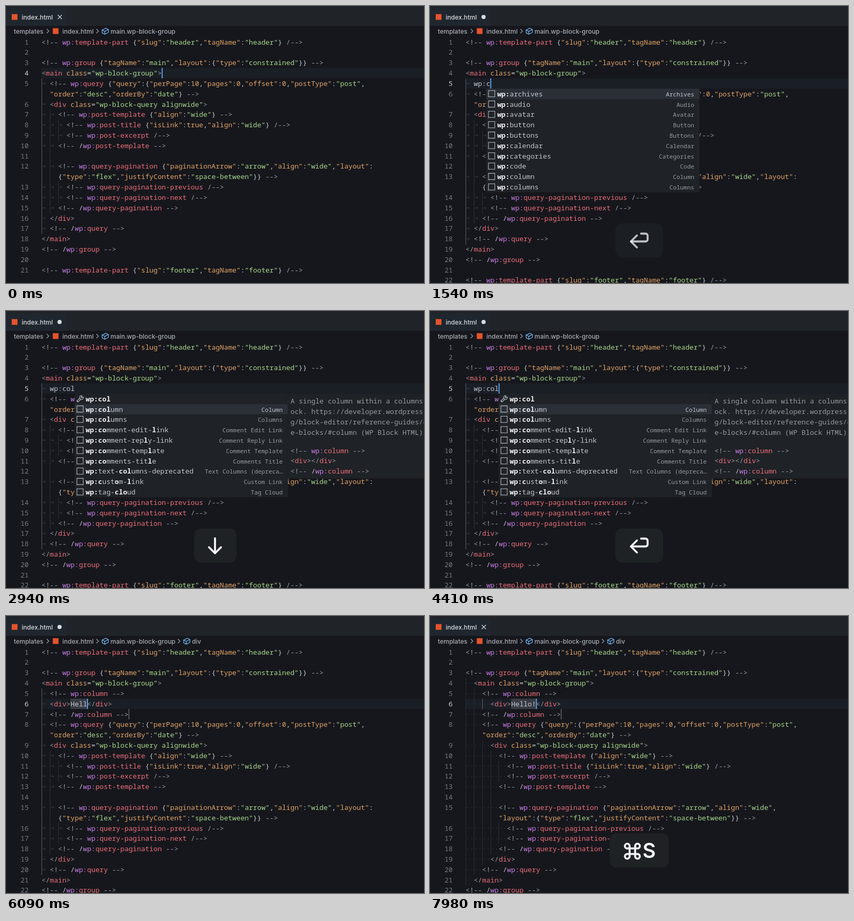
Recreate the animation shown at these times as an HTML page with a canvas. Size 800 px wide and 530 px high, loop 8 s.

```html
<!DOCTYPE html>
<html lang="en">
<head>
<meta charset="utf-8">
<title>Block editing</title>
<style>
  html, body { margin: 0; width: 100%; height: 100%; overflow: hidden; background: #16171c; }
  canvas { display: block; }
</style>
</head>
<body>
<canvas id="stage" width="800" height="530"></canvas>
<script>
const ctx = document.getElementById('stage').getContext('2d');

const LOOP = 8000, LEFT = 68, CHAR = 7.937, ROW = 19.82, TOP = 69, COLS = 80;
const MONO = '"Noto Sans Mono", "DejaVu Sans Mono", monospace';
const CODE = `500 13.23px ${MONO}`, BOLD = `bold 13.23px ${MONO}`;
const SMALL = `500 11.3px ${MONO}`, UI = '500 12px Inter, sans-serif';

const C = {
  bg: '#16171c', bar: '#202429', tab: '#20262d', line: '#1a1e25', popup: '#1f2226', picked: '#2b2f36',
  text: '#c3c8d1', dim: '#979da6', faint: '#34373e', guide: '#2b2e34', activeGuide: '#5a5e66',
  number: '#737984', white: '#f2f4f7', red: '#ec6f7b', purple: '#c87de6',
  orange: '#e2a468', green: '#a8d98c', blue: '#5a9cf0', icon: '#75beff', html: '#e5532d'
};

// Timeline in ms
const T = { enter: 420, down: 2770, accept: 4410, insert: 4480, crumb: 4760, save: 7350, format: 7490 };
const QUERY_KEYS = [840, 1050, 1260, 1540, 1750, 1950];
const HELLO_KEYS = [5460, 5670, 5810, 5950, 6160, 6440];
const EDITS = [0, T.enter, ...QUERY_KEYS, T.insert, ...HELLO_KEYS, T.format];
const POPUP_LAG = 70;
const KEYS = [
  { at: T.enter, width: 91, draw: drawReturn },
  { at: T.down, width: 81, draw: drawDown },
  { at: T.accept, width: 91, draw: drawReturn },
  { at: T.save, width: 113, draw: drawSave }
];

// Each leading dot is one level of indentation
const parse = src => src.trim().split('\n').map(s => {
  const depth = s.match(/^\.*/)[0].length;
  return { depth, text: s.slice(depth).trim() };
});

const HEAD = parse(`
<!-- wp:template-part {"slug":"header","tagName":"header"} /-->

<!-- wp:group {"tagName":"main","layout":{"type":"constrained"}} -->
<main class="wp-block-group">`);
const BODY = parse(`
.<!-- wp:query {"query":{"perPage":10,"pages":0,"offset":0,"postType":"post","order":"desc","orderBy":"date"} -->
.<div class="wp-block-query alignwide">
..<!-- wp:post-template {"align":"wide"} -->
...<!-- wp:post-title {"isLink":true,"align":"wide"} /-->
...<!-- wp:post-excerpt /-->
..<!-- /wp:post-template -->
..
..<!-- wp:query-pagination {"paginationArrow":"arrow","align":"wide","layout":{"type":"flex","justifyContent":"space-between"}} -->
...<!-- wp:query-pagination-previous /-->
...<!-- wp:query-pagination-next /-->
..<!-- /wp:query-pagination -->
.</div>
.<!-- /wp:query -->
</main>
<!-- /wp:group -->

<!-- wp:template-part {"slug":"footer","tagName":"footer"} /-->`);

const RULES = [
  [/<!--|\/?-->/, C.dim], [/(?<=wp:)[\w-]+/, C.red], [/wp:/, C.purple],
  [/"[^"]*"(?=:)/, C.orange], [/"[^"]*"/, C.green], [/(?<=<\/?)\w+/, C.red],
  [/\b(?:class|true|\d+)\b/, C.orange], [/<\/?|>/, C.dim]
];
const LEXER = new RegExp(RULES.map(r => `(${r[0].source})`).join('|'), 'g');

// Suggestions: "~" marks a plain word, "!" an abbreviation, the rest are blocks
const POPUPS = {
  'w': '~wide ~wp ~wp-block-group ~wp-block-query archives audio avatar button buttons calendar',
  'wp': '~wp ~wp-block-group ~wp-block-query archives audio avatar button buttons calendar categories',
  'wp:': 'archives audio avatar button buttons calendar categories code column columns',
  'wp:c': '!wp:c calendar categories code column columns comment-author-avatar-depre… comment-author-name comment-content comment-date',
  'wp:co': '!wp:co code column columns comment-author-avatar-depre… comment-author-name comment-content comment-date comment-edit-link comment-reply-link',
  'wp:col': '!wp:col column columns comment-edit-link comment-reply-link comment-template comments-title text-columns-deprecated custom-link tag-cloud'
};
const DETAILS = {
  'comment-author-avatar-depre…': 'Comment Author …',
  'text-columns-deprecated': 'Text Columns (depreca…'
};
const MATCHES = { 'tag-cloud': 'wp:clo' };
const COLUMN_DOC = [
  'A single column within a columns bl', 'ock. https://developer.wordpress.or',
  'g/block-editor/reference-guides/cor', 'e-blocks/#column (WP Block HTML)'
];

const rowY = row => TOP + row * ROW;
const colX = col => LEFT + col * CHAR;
const typed = (word, times, t) => word.slice(0, times.filter(k => t >= k).length);

function rect(x, y, w, h, color) {
  ctx.fillStyle = color;
  ctx.fillRect(x, y, w, h);
}

function write(s, x, y, color, font = CODE, align = 'left') {
  ctx.font = font;
  ctx.fillStyle = color;
  ctx.textAlign = align;
  ctx.fillText(s, x, y + 4.6);
}

function stroke(points, color, width = 1) {
  ctx.strokeStyle = color;
  ctx.lineWidth = width;
  ctx.beginPath();
  points.forEach(([x, y]) => ctx.lineTo(x, y));
  ctx.stroke();
}

function writeCode(s, x, y) {
  let last = 0;
  const put = (from, to, color) => to > from && write(s.slice(from, to), x + from * CHAR, y, color);
  if (s.includes('<') || s.includes('"')) {
    for (const m of s.matchAll(LEXER)) {
      put(last, m.index, C.text);
      last = m.index + m[0].length;
      put(m.index, last, RULES[m.slice(1).findIndex(g => g !== undefined)][1]);
    }
  }
  put(last, s.length, C.text);
}

function format(lines) {
  let depth = 0;
  return lines.map(({ text }) => {
    const closing = /^<(!-- )?\//.test(text);
    if (closing) depth--;
    const line = { depth, text };
    if (text && !closing && !text.endsWith('/-->') && !text.includes('</')) depth++;
    return line;
  });
}

function documentAt(t) {
  if (t < T.enter) return { lines: [...HEAD, ...BODY], cursor: 3, col: 29 };
  if (t < T.insert) {
    const text = typed('wp:col', QUERY_KEYS, t);
    return { lines: [...HEAD, { depth: 1, text }, ...BODY], cursor: 4, col: 2 + text.length };
  }
  const hello = typed('Hello!', HELLO_KEYS, t);
  const snippet = parse(`.<!-- wp:column -->\n.<div>${hello}</div>\n.<!-- /wp:column -->`);
  const raw = [...HEAD, ...snippet, ...BODY];
  const spaced = t >= T.format;
  const lines = spaced ? format(raw) : raw;
  const start = lines[5].depth * 2 + 5;
  return { lines, cursor: 5, col: start + hello.length, start, spaced };
}

function wrap({ depth, text }) {
  const room = COLS - depth * 2;
  if (text.length <= room) return [text];
  const head = text.slice(0, room);
  const cut = Math.max(head.lastIndexOf(','), head.lastIndexOf(':')) + 1;
  return [text.slice(0, cut), text.slice(cut)];
}

function drawLine(line, index, row, doc) {
  const { depth, text } = line, parts = wrap(line), y = rowY(row), top = y - ROW / 2;
  const current = index === doc.cursor;
  if (current) {
    rect(LEFT, top, 800 - LEFT, ROW, C.line);
    if (doc.start) rect(colX(doc.start), top, Math.max(2, (doc.col - doc.start) * CHAR), ROW, '#393d43');
  }
  for (let k = 0; k < depth; k++) {
    const active = doc.spaced ? k === 2 && index === 5 : k === 0;
    rect(Math.round(colX(k * 2)), top, 1, ROW * parts.length + 0.5, active ? C.activeGuide : C.guide);
    if (!text) continue;
    if (doc.spaced) {
      for (const c of [0.5, 1.5]) rect(colX(k * 2 + c) - 0.7, y - 0.5, 1.4, 1.4, C.faint);
    } else {
      const x = colX(k * 2) + 1.5;
      stroke([[x, y], [x + 6, y]], C.faint);
      stroke([[x + 3.5, y - 2], [x + 6, y], [x + 3.5, y + 2]], C.faint);
    }
  }
  write(index + 1, 43.5, y, current ? '#ccd0d7' : C.number, CODE, 'right');
  parts.forEach((part, i) => writeCode(part, colX(depth * 2), rowY(row + i)));
  if (doc.start && index === 6) rect(colX(depth * 2 + text.length), top, 1.2, ROW, '#777b82');
  return parts.length;
}

function drawEditor(t) {
  const doc = documentAt(t);
  let row = 0, cursorRow = 0;
  doc.lines.forEach((line, i) => {
    if (i === doc.cursor) cursorRow = row;
    if (row < 24) row += drawLine(line, i, row, doc);
  });
  const lastEdit = EDITS.filter(e => e <= t).pop();
  if ((t - lastEdit) % 1000 < 500) rect(colX(doc.col) - 0.3, rowY(cursorRow) - ROW / 2, 2, ROW, C.blue);
}

function drawCube(x, y) {
  const p = (dx, dy) => [x + dx, y + dy];
  stroke([p(-6, -2), p(1, -5.5), p(6, -3), p(6, 2.5), p(-1, 6), p(-6, 3.3), p(-6, -2), p(-1, 0.5), p(6, -3)], C.icon, 1.2);
  stroke([p(-1, 0.5), p(-1, 6)], C.icon, 1.2);
}

function drawChevron(x) {
  stroke([[x - 2, 44], [x + 2, 48], [x - 2, 52]], '#9a9fa7', 1.3);
}

function drawHeader(t) {
  rect(0, 0, 800, 38, C.bar);
  rect(0, 5, 116, 33, C.tab);
  rect(11, 15.5, 11, 11, C.html);
  write('index.html', 30, 21, '#d8dbe0', UI);
  if (t >= T.enter && t < T.format) {
    ctx.fillStyle = '#d8dbe0';
    ctx.beginPath();
    ctx.arc(102.5, 21, 4, 0, 7);
    ctx.fill();
  } else {
    stroke([[99, 17], [107, 25]], '#d0d3d8', 1.2);
    stroke([[107, 17], [99, 25]], '#d0d3d8', 1.2);
  }
  const crumb = '#a8adb5';
  write('templates', 15, 48, crumb, UI);
  drawChevron(80);
  rect(89.5, 42.5, 11, 11, C.html);
  write('index.html', 108, 48, crumb, UI);
  drawChevron(175);
  drawCube(190, 48);
  write('main.wp-block-group', 200, 48, crumb, UI);
  if (t >= T.crumb) {
    drawChevron(331);
    drawCube(346, 48);
    write('div', 356, 48, crumb, UI);
  }
}

function drawItemIcon(kind, x, y) {
  if (kind === '~') {
    write('abc', x + 3, y - 0.5, C.text, '9px Inter, sans-serif');
  } else if (kind === '!') {
    ctx.strokeStyle = C.text;
    ctx.lineWidth = 1.2;
    ctx.beginPath();
    ctx.arc(x + 13, y - 2.5, 3.6, -0.3, 4.9);
    ctx.stroke();
    stroke([[x + 14, y - 6], [x + 12.5, y - 2.5], [x + 16.5, y - 3.5]], C.text, 1.2);
    stroke([[x + 9.5, y - 1], [x + 4, y + 4.2], [x + 6, y + 6], [x + 11.8, y + 1]], C.text, 1.2);
  } else {
    ctx.setLineDash([1.6, 0.5]);
    ctx.strokeStyle = C.text;
    ctx.lineWidth = 1.3;
    ctx.strokeRect(x + 4.2, y - 6.4, 12, 12);
    ctx.setLineDash([]);
  }
}

function writeLabel(label, query, x, y) {
  let hit = 0;
  [...label].forEach((ch, i) => {
    const match = ch === query[hit];
    if (match) hit++;
    write(ch, x + i * CHAR, y, match ? C.white : C.text, match ? BOLD : CODE);
  });
}

function drawDocs(x, query, picked) {
  const top = rowY(5) - ROW / 2, first = 172.8;
  if (picked) {
    rect(x, top, 800 - x, 162, C.popup);
    COLUMN_DOC.forEach((s, i) => write(s, x + 5, first + i * ROW, C.dim));
    ['<!-- wp:column -->', '<div></div>', '<!-- /wp:column -->']
      .forEach((s, i) => writeCode(s, x + 5, 267 + i * ROW));
  } else {
    rect(x, top, 800 - x, 62.5, C.popup);
    write('Emmet Abbreviation', x + 5, first, C.dim);
    write(`<${query}>|</${query}>`, x + 5, 207.7, C.text);
  }
}

function drawPopup(t) {
  if (t >= T.insert) return;
  const query = typed('wp:col', QUERY_KEYS, t - POPUP_LAG);
  if (!query) return;
  const x = colX(2 + query.length), top = rowY(5) - ROW / 2;
  const selected = t >= T.down ? 1 : 0;
  const items = POPUPS[query].split(' ');
  rect(x, top, 408, ROW * 10, C.popup);
  rect(x, top + selected * ROW, 408, ROW, C.picked);
  items.forEach((item, i) => {
    const y = rowY(5 + i), kind = item[0], block = !'~!'.includes(kind);
    drawItemIcon(kind, x, y);
    writeLabel(block ? 'wp:' + item : item.slice(1), MATCHES[item] || query, x + 21, y);
    if (!block) return;
    const title = item.split('-').map(w => w[0].toUpperCase() + w.slice(1)).join(' ');
    write(DETAILS[item] || title, x + 398, y, i === selected ? C.text : C.dim, SMALL, 'right');
  });
  if (items[0][0] === '!') {
    if (query !== 'wp:col') rect(x + 399, top, 8, 54, '#40444b');
    drawDocs(x + 408, query, selected);
  }
}

function drawReturn() {
  ctx.beginPath();
  ctx.moveTo(404, 435.5);
  ctx.lineTo(412, 435.5);
  ctx.arcTo(416.5, 435.5, 416.5, 440, 4);
  ctx.arcTo(416.5, 450.5, 412, 450.5, 4);
  ctx.lineTo(385, 450.5);
  ctx.stroke();
  stroke([[396, 439], [384.5, 450.5], [396, 462]], C.white, 3.8);
}

function drawDown() {
  stroke([[400, 435], [400, 463]], C.white, 3.8);
  stroke([[388.5, 452], [400, 463.5], [411.5, 452]], C.white, 3.8);
}

function drawSave() {
  ctx.save();
  ctx.translate(387.3, 450);
  ctx.lineWidth = 3.8;
  for (let i = 0; i < 4; i++) {
    ctx.beginPath();
    ctx.moveTo(5.3, -10);
    ctx.lineTo(5.3, 10);
    ctx.arc(9.8, 9.8, 4.5, Math.PI, -Math.PI / 2, true);
    ctx.stroke();
    ctx.rotate(Math.PI / 2);
  }
  ctx.restore();
  write('S', 419.5, 458.5, C.white, '600 39px Inter, sans-serif', 'center');
}

function drawKeys(t) {
  const key = KEYS.filter(k => k.at <= t).pop();
  if (!key) return;
  const alpha = 1 - (t - key.at - 1000) / 500;
  if (alpha <= 0) return;
  ctx.save();
  ctx.globalAlpha = Math.min(1, alpha);
  ctx.fillStyle = '#1e2225';
  ctx.beginPath();
  ctx.roundRect(400.5 - key.width / 2, 416, key.width, 65.5, 13);
  ctx.fill();
  ctx.strokeStyle = C.white;
  ctx.lineWidth = 3.8;
  ctx.lineCap = ctx.lineJoin = 'round';
  key.draw();
  ctx.restore();
}

function draw(now) {
  const t = now % LOOP;
  rect(0, 0, 800, 530, C.bg);
  drawEditor(t);
  drawHeader(t);
  drawPopup(t);
  drawKeys(t);
}

let begin;
function tick(now) {
  begin ??= now;
  draw(now - begin);
  requestAnimationFrame(tick);
}
draw(0);
requestAnimationFrame(tick);
</script>
</body>
</html>
```
